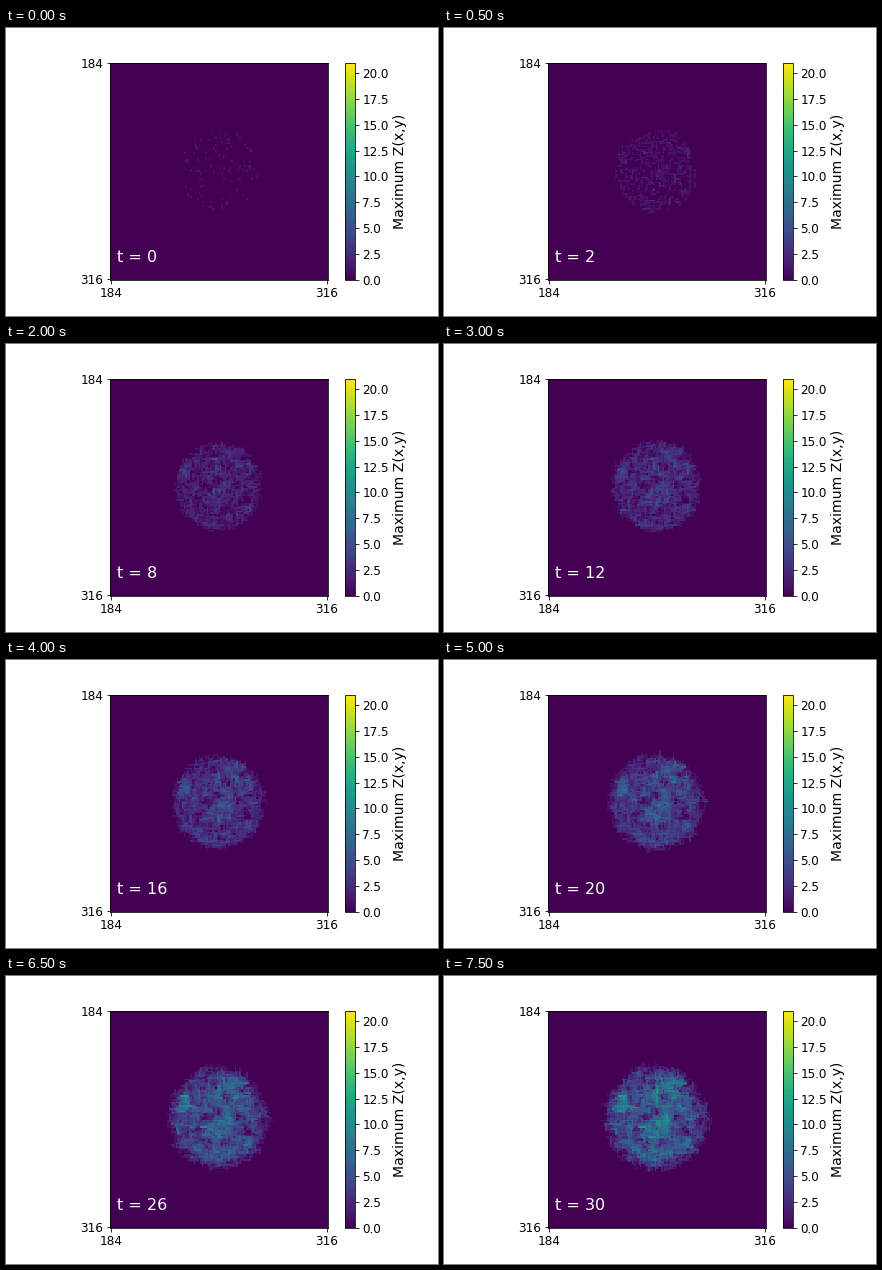
Animation, 432 px wide and 288 px high, one loop 8 s. Source, as a matplotlib script:

```python
import numpy as np
import matplotlib.pyplot as plt
from matplotlib.animation import FuncAnimation

FIRST, LAST = 184, 316
SIZE = LAST - FIRST + 1
MID = SIZE // 2
FRAMES, STEP = 16, 2

rng = np.random.default_rng(12)


def clump_map():
    """Smooth field that makes some spots grow faster than others."""
    g = rng.normal(size=(SIZE, SIZE))
    for _ in range(5):
        g = (g + sum(np.roll(g, s, a) for s in (-1, 1) for a in (0, 1))) / 5
    g /= g.std()
    y, x = np.mgrid[:SIZE, :SIZE] - MID
    for cx, cy in ((-23, -7), (4, 21), (-18, -10), (8, 2)):
        g += 1.3 * np.exp(-((x - cx) ** 2 + (y - cy) ** 2) / 14)
    return g


def radius(t, angle):
    bumps = np.sin(3 * angle + 0.6) + np.sin(7 * angle + 2) + np.sin(11 * angle)
    spike = np.exp(-((angle + 1.8) / 0.12) ** 2)
    return 24.8 + 0.26 * t + t / 30 * (0.5 * bumps + 2.2 * spike)


def drop_rod(h, t, clumps):
    """Lay one short rod on the pile, flat or upright in the plane."""
    angle = rng.uniform(-np.pi, np.pi)
    r = radius(t, angle) * np.sqrt(rng.random())
    x = int(round(MID + r * np.cos(angle)))
    y = int(round(MID + r * np.sin(angle)))
    if rng.random() > 0.55 + 0.2 * clumps[y, x]:
        return
    length = rng.integers(1, 3) if t == 0 else rng.integers(2, 5)
    a = -(length // 2)
    if rng.random() < 0.5:
        rod = h[y, x + a:x + a + length]
    else:
        rod = h[y + a:y + a + length, x]
    base = np.median(rod) if rng.random() < t / 60 else rod.min()
    np.maximum(rod, int(base) + 1, out=rod)


def grow():
    h = np.zeros((SIZE, SIZE), int)
    clumps = clump_map()
    fields = []
    for t in range(0, FRAMES * STEP, STEP):
        mean = np.interp(t, [0, 2, 4, 30], [0.085, 0.5, 1.0, 4.4])
        goal = mean * np.pi * (24.8 + 0.26 * t) ** 2
        while h.sum() < goal:
            drop_rod(h, t, clumps)
        fields.append(h.copy())
    return fields


fields = grow()

plt.rcParams.update({
    "font.family": "DejaVu Sans",
    "xtick.labelsize": 12,
    "ytick.labelsize": 12,
    "figure.subplot.left": 0.125,
    "figure.subplot.right": 0.9,
    "figure.subplot.bottom": 0.125,
    "figure.subplot.top": 0.88,
})

fig, ax = plt.subplots(figsize=(6, 4), dpi=72)
edges = (FIRST - 0.5, LAST + 0.5, LAST + 0.5, FIRST - 0.5)
im = ax.imshow(fields[0], cmap="viridis", vmin=0, vmax=21,
               interpolation="nearest", extent=edges)
ax.set_xticks([FIRST, LAST])
ax.set_yticks([FIRST, LAST])
bar = fig.colorbar(im, ax=ax, ticks=np.arange(0, 21, 2.5))
bar.set_label("Maximum Z(x,y)", fontsize=14)
label = ax.text(0.03, 0.083, "t = 0", color="white", fontsize=16,
                transform=ax.transAxes)


def update(i):
    im.set_data(fields[i])
    label.set_text(f"t = {i * STEP}")
    return im, label


anim = FuncAnimation(fig, update, frames=FRAMES, interval=500,
                     repeat=True, repeat_delay=0)
plt.show()
```
